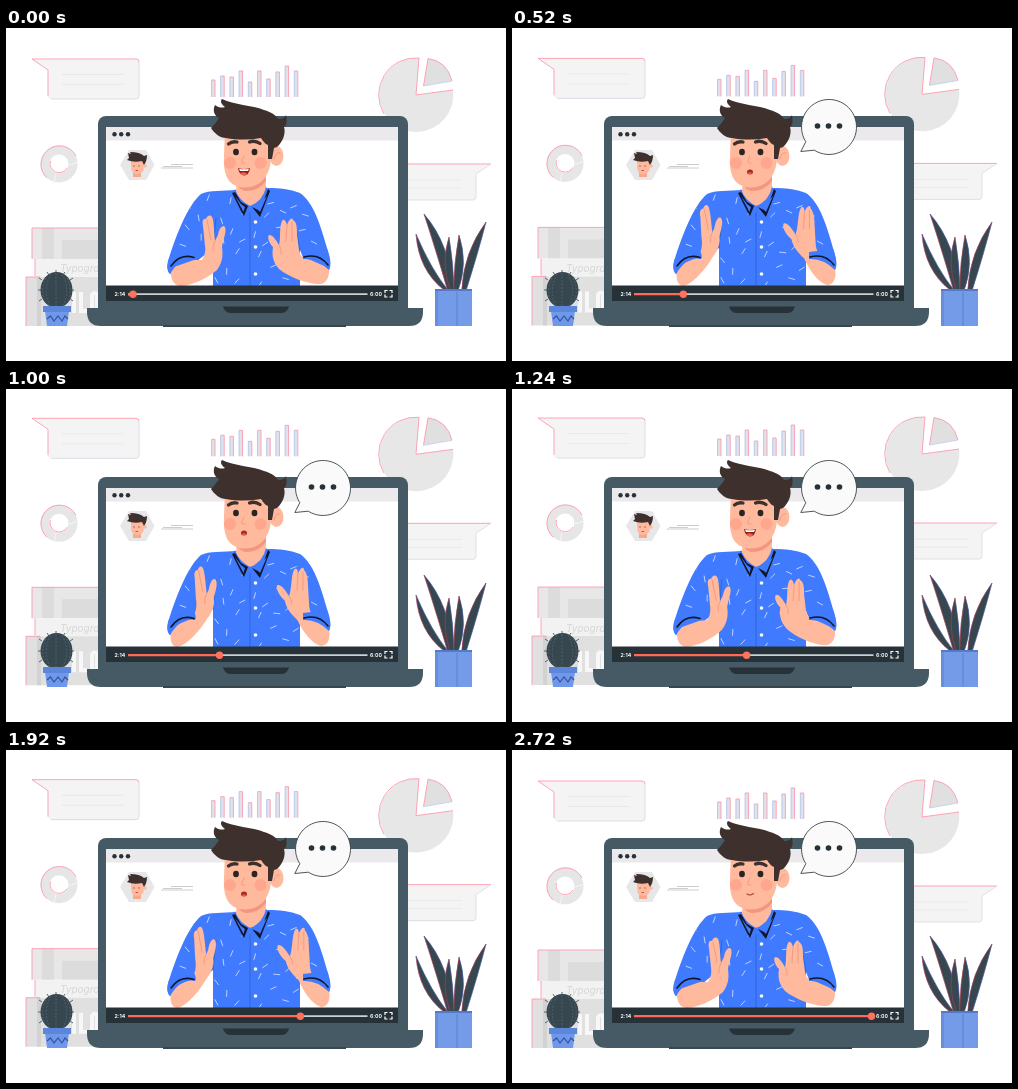
These frames come from a looping animation (500 by 333 pixels, 2740 ms). An HTML page:

```html
<!DOCTYPE html>
<html lang="en">
<head>
<meta charset="utf-8">
<title>Video call</title>
<style>
html, body { margin: 0; width: 100%; height: 100%; overflow: hidden; background: #fff; }
svg { display: block; width: 100%; height: 100%; }
text { font-family: Inter, sans-serif; }
.float, .hand, .talk, .played, .knob { animation: 2740ms linear infinite; }
.float { animation-name: float; animation-timing-function: ease-in-out; }
@keyframes float { 50% { transform: translateY(-2px); } }
.hand { d: var(--closed); animation-duration: 1370ms; animation-timing-function: ease-in-out; animation-name: wave; }
@keyframes wave {
  0%, 97%, 100% { d: var(--closed); }
  44%, 67% { d: var(--open); }
}
.left.hand {
  --closed: path("M165 240C164 250 167 257 174 258C184 258 201 251 211 242C217 234 217 226 216 219C217 211 221 204 219 199C217 196 213 200 212 207L209 213C208 205 208 192 206 189C204 186 201 188 200 191C197 190 196 194 197 198L199 218C200 224 198 229 196 232L188 232Z");
  --open: path("M165 238C164 250 164 257 171 258C179 257 192 243 200 229C207 220 208 213 207 208C209 201 211 194 209 190C206 187 203 193 202 200L200 204C199 196 198 181 196 178C194 175 192 177 191 180C188 180 187 184 188 188L189 208C190 214 190 219 188 224L184 230Z");
}
.right.hand {
  --closed: path("M323 240C324 252 318 257 311 256C299 255 283 249 273 241C266 233 266 226 267 219C263 215 261 209 263 207C267 207 270 212 273 217C275 210 273 199 276 193C278 190 280 193 281 197C283 191 286 189 287 192C291 194 291 200 291 207L293 222C294 228 297 230 300 230Z");
  --open: path("M323 240C325 250 322 257 315 257C306 254 298 242 293 230C284 222 281 216 280 211C274 206 270 198 272 195C276 194 280 200 284 206C287 198 286 186 289 180C291 177 293 179 293 183C296 177 299 176 299 180C302 183 303 190 303 196L304 214C304 219 305 223 308 227Z");
}
.left.hand.crease {
  --closed: path("M201 192L205 212M209 213Q206 218 207 223");
  --open: path("M192 181L196 202M200 204Q197 209 198 214");
}
.right.hand.crease {
  --closed: path("M281 197L280 213M286 194L286 213M273 217Q276 221 275 226");
  --open: path("M293 183L292 200M298 182L298 200M284 206Q287 210 287 214");
}
.talk { transform-origin: 290px 124px; animation-name: pop; }
@keyframes pop {
  0%, 6.2% { transform: scale(0); animation-timing-function: ease-in-out; }
  17.2%, 100% { transform: scale(1); }
}
.played { transform-origin: 122px 0; animation-name: fill; }
@keyframes fill { 0% { transform: scaleX(.0147); } 97.15%, 100% { transform: none; } }
.knob { animation-name: slide; }
@keyframes slide { 97.15%, 100% { transform: translateX(234px); } }
.edge { fill: none; stroke: #ff9aae; stroke-width: .9; }
.rule { fill: none; stroke: #e6e6e6; stroke-width: .8; }
.skin { fill: #ffb99c; }
.blue { fill: #407bff; }
.crease { fill: none; stroke: #f08f78; stroke-width: .7; stroke-linecap: round; }
.ink { fill: none; stroke: #10172b; stroke-width: 1.6; stroke-linecap: round; }
</style>
</head>
<body>
<svg viewBox="0 0 500 333" preserveAspectRatio="none">
  <defs>
    <clipPath id="shirtClip"><path d="M196 166L226 164L238 188L254 188L264 162L293 166C306 183 316 205 320 220L299 224L294 222V257H207V220L190 228L166 230C172 207 181 179 196 166Z"/></clipPath>
  </defs>

  <g class="float">
    <path fill="#f4f4f4" d="M26 31H130Q133 31 133 34V68Q133 71 130 71H45Q42 71 42 68V42Z"/>
    <path class="edge" d="M42 68V42L26 31H130Q133 31 133 34"/>
    <path class="edge" style="stroke:#d9dbe4" d="M133 34V68Q133 71 130 71H45"/>
    <path class="rule" d="M56 46.500H117M56 56.500H117"/>

    <g id="bars"></g>

    <path fill="#e7e7e7" d="M410 67L413 30A37 37 0 1 0 447 62Z"/>
    <path class="edge" d="M410 67L413 30A37 37 0 0 0 378 86M410 67L447 62"/>
    <path fill="#e0e0e0" d="M417.500 58L422 30.500Q441 33 446 53Z"/>
    <path class="edge" d="M417.500 58L422 30.500Q441 33 446 53"/>
    <path class="edge" style="stroke:#c8d0ee" d="M417.500 58L446 53"/>

    <circle cx="53" cy="136" r="14" fill="none" stroke="#e6e6e6" stroke-width="9"/>
    <path fill="none" stroke="#f6f6f6" d="M63 137L72 134M50 146L48 155"/>
    <path class="edge" d="M41 150A18.500 18.500 0 1 1 70 128M44.500 133A9 9 0 0 0 61 140"/>

    <path fill="#f4f4f4" d="M392 136H485L470 146V169Q470 172 467 172H392Z"/>
    <path class="edge" d="M401 136H485"/>
    <path class="edge" style="stroke:#dcdee6" d="M485 136L470 146V169Q470 172 467 172H401"/>
    <path class="rule" d="M402 152H456M402 160H456"/>

    <path fill="#e7e7e7" d="M26 200H93V231H26Z"/>
    <path fill="#dcdcdc" d="M36 200H48V231H36ZM56 212H93V231H56Z"/>
    <path fill="#f2f2f2" d="M29 231H93V249H29Z"/>
    <text x="54" y="244.500" font-size="10" font-style="italic" fill="#d6d6d6">Typography</text>
    <path fill="#e0e0e0" d="M20 249H93V298H20Z"/>
    <path fill="#d2d2d2" d="M31 249H35V298H31Z"/>
    <path fill="none" stroke="#f7f7f7" stroke-width="4" d="M68 264V285M75 264V283H81M86 267Q88 264 91 266V283H86Z"/>
    <path class="edge" d="M26 231V200H93M29 248V231M20 298V249H34"/>
  </g>

  <g id="plant"></g>
  <path fill="#739be7" d="M429 261H466V298H429Z"/>
  <path fill="#668edb" d="M429 261H432V298H429ZM450 264H452V298H450Z"/>
  <path fill="#5379c7" d="M429 261H466V263H429Z"/>

  <path fill="none" stroke="#37474f" stroke-width=".8" d="M36 252L33 250M35 262H32M36 271L33 273M64 252L67 250M65 262H68M64 271L67 273M43 247L41 244M50 245V242M57 247L59 244"/>
  <ellipse cx="50.500" cy="262" rx="16" ry="18" fill="#37474f"/>
  <path fill="none" stroke="#566870" stroke-width=".8" stroke-dasharray="2 1.500" d="M50 245V279M45 246Q36 262 44 278M56 246Q65 262 57 278M40 250Q34 262 39 274M61 250Q67 262 62 274"/>
  <path fill="#6f98ea" d="M39 283H63L61 298H41Z"/>
  <path fill="#5c86d9" d="M37 278H65V284H37Z"/>
  <path fill="none" stroke="#31549e" stroke-width="1.200" d="M41 291L44.500 288L48 293L52 288L56 293L59 288L62 291"/>

  <rect x="92" y="88" width="310" height="200" rx="8" fill="#455a64"/>
  <path fill="#fff" d="M100 99H392V258H100Z"/>
  <path fill="#ebe9eb" d="M100 99H392V112.500H100Z"/>
  <g fill="#263238"><circle cx="108.500" cy="106.300" r="2.200"/><circle cx="115.200" cy="106.300" r="2.200"/><circle cx="122" cy="106.300" r="2.200"/></g>
  <path fill="#455a64" d="M81 280H417V284Q417 298 403 298H95Q81 298 81 284Z"/>
  <path fill="#37474f" d="M157 297H340V299H157Z"/>
  <path fill="#263238" d="M217 278.500H283Q281 285 276 285H224Q219 285 217 278.500Z"/>

  <path fill="#e7e7e9" d="M114 137L123 122H140L148.500 137L140 152H123Z"/>
  <path fill="#f5aa8d" d="M127 142H135V149H127Z"/>
  <path class="skin" d="M125 132H138V138Q138 146 131 146Q125 146 125 138Z"/>
  <circle cx="139" cy="138" r="1.800" class="skin"/>
  <path fill="#3d302d" d="M121 132L123 130L122 125L125 126L124 124Q134 124 138 128L141 127Q141 133 138 137L136 133Q128 135 121 132Z"/>
  <path fill="none" stroke="#3d302d" d="M127.500 138h1M132.500 138h1"/>
  <path fill="none" stroke="#d54b45" d="M129.500 142.500h2.500"/>
  <path fill="none" stroke="#c0c0c0" stroke-width=".8" d="M165 136.500H187M155 140H187M157 138.500H176"/>

  <g id="person">
    <path class="blue" d="M230 162C217 163 203 162 195 166C182 177 171 205 163 230C160 238 161 243 164 246L190 234L207 220V258H294V222L298 232L323 242C326 237 324 229 321 220C314 195 307 174 294 165C284 161 273 160 262 160Z"/>
    <path fill="none" stroke="#2e5fcc" stroke-width=".8" d="M207 220L210 190M294 222L289 196M244 184V258"/>
    <g id="dashes" clip-path="url(#shirtClip)" stroke="#dce7ff" stroke-width=".8" stroke-linecap="round"></g>
    <path class="skin" d="M231 148H260V164Q253 178 244 178Q234 173 230 164Z"/>
    <path fill="#f2967e" d="M232 156Q249 161 260 149V153Q253 163 239 163Q232 161 232 156Z"/>
    <path class="blue" d="M229 161Q232 172 244 178L238 187L226 166ZM260 159Q257 173 244 178L254 187L264 163Z"/>
    <path fill="#10172b" d="M226 165L229 164L235 174L242 178L238 188L235 183ZM262 161L264 163L254 189L246 179L254 183Z"/>
    <path class="blue" d="M229 168L235 176L239 179L237.500 184ZM261 168L254 184L249 178L256 173Z"/>
    <g fill="#fff"><circle cx="249.500" cy="194" r="1.800"/><circle cx="249.500" cy="219" r="1.800"/><circle cx="249.500" cy="246" r="1.800"/></g>

    <ellipse cx="270.500" cy="128" rx="7" ry="10" class="skin"/>
    <path class="crease" d="M268 131Q270 123 274 125"/>
    <path class="skin" d="M219 102L218 128C217 147 222 158.500 238 159.500C254 160 264 148 265 131L267 104Z"/>
    <g fill="#ff9681" opacity=".5"><circle cx="224" cy="135" r="6"/><circle cx="254.500" cy="135" r="6"/></g>
    <path fill="#3d302d" d="M205 100C209 96 211 93 213 90C207 87 207 81 209 77C213 80 216 80 219 79C215 76 214 73 216 71C228 77 246 77 258 82C265 84 270 87 272 91Q279 91 280 87C281 93 281 97 278 99C280 105 277 114 271 119L268 120L266 131H262V117C259 116 257 113 255 110C243 112 231 112 220 110C214 110 208 105 205 100Z"/>
    <path fill="none" stroke="#3d302d" stroke-width="3.300" stroke-linecap="round" d="M222.500 116Q226 113 231 114M243.500 114Q249 112 254 115.500"/>
    <g fill="#2c2423"><ellipse cx="230" cy="124" rx="2.900" ry="3.200"/><ellipse cx="248.500" cy="124" rx="2.900" ry="3.200"/></g>
    <path class="crease" d="M238 128L235.500 134Q237 136 239 135"/>
    <g class="mouth" data-shape="open">
      <path fill="#8d211f" d="M232 140Q238 142 244 140Q243 147.500 238 147.500Q233 147 232 140Z"/>
      <path fill="#fff" d="M233 140.700Q238 142 243 140.700L242 143H234Z"/>
      <path fill="#f0604f" d="M234 145.500Q238 143 241.500 146Q238 149 234 145.500Z"/>
    </g>
    <g class="mouth" data-shape="smile">
      <path fill="#a52a27" d="M232.500 140.500Q238 142 243.500 140.500Q242 146.500 238 146.500Q234 146 232.500 140.500Z"/>
      <path fill="#fff" d="M233.500 141.200Q238 142.500 242.500 141.200L241 144H235Z"/>
    </g>
    <g class="mouth" data-shape="round">
      <ellipse cx="238" cy="144" rx="3" ry="2.500" fill="#a52a27"/>
      <ellipse cx="238" cy="145.200" rx="1.800" ry="1" fill="#f0604f"/>
    </g>
    <g class="mouth" data-shape="closed">
      <path fill="none" stroke="#b74a40" stroke-width="1.200" stroke-linecap="round" d="M235 144Q238 146 241.500 143.500"/>
    </g>

    <path class="hand left skin"/>
    <path class="hand left crease"/>
    <path class="hand right skin"/>
    <path class="hand right crease"/>
    <path class="blue" d="M163 230L188 223Q191 228 189 231Q175 228 164 246Q160 242 163 230ZM297 224L321 221Q326 235 323 242Q311 230 297 231Z"/>
    <path class="ink" d="M165 238Q174 225 188 229.500M298 229Q313 225 322 237"/>
  </g>

  <path fill="#263238" d="M100 257.500H392V273H100Z"/>
  <g fill="#fff" font-size="5.200" font-weight="700"><text x="108.500" y="268">2:14</text><text x="364" y="268">6:00</text></g>
  <path fill="none" stroke="#fff" stroke-width="1.200" d="M379 265V262.500H381.500M383.500 262.500H386V265M386 266.500V269H383.500M381.500 269H379V266.500"/>
  <path fill="#c9d0d4" d="M122 265.300H361.500V267H122Z"/>
  <path class="played" fill="#ff6a57" d="M122 265H359.500V267.200H122Z"/>
  <circle class="knob" cx="125.500" cy="266.300" r="3.700" fill="#ff725e"/>

  <g class="talk">
    <path fill="#fafafa" stroke="#3b4347" stroke-width=".9" d="M288.800 123.500L293.800 113.700A27.500 27.500 0 1 1 302.300 122.200Z"/>
    <g fill="#263238"><circle cx="305.500" cy="98" r="2.800"/><circle cx="316.500" cy="98" r="2.800"/><circle cx="327.500" cy="98" r="2.800"/></g>
  </g>
</svg>
<script>
const NS = "http://www.w3.org/2000/svg";
const LOOP = 2740;

function add(parent, attrs) {
  const path = document.createElementNS(NS, "path");
  for (const name in attrs) path.setAttribute(name, attrs[name]);
  document.getElementById(parent).append(path);
}

[52, 48, 49, 43, 54, 43, 51, 44, 38, 43].forEach((top, i) => {
  const x = 205.5 + i * 9.2;
  add("bars", { d: `M${x} ${top}h3.500V69h-3.500Z`, fill: "#dfe2ea" });
  add("bars", { d: `M${x} ${top}h3.500V69`, class: "edge" });
  add("bars", { d: `M${x} ${top}V69`, class: "edge", style: "stroke:#b5c3ee" });
});

// Each leaf: tip, bend, foot x, half width.
const leaves = [
  [410, 206, 419, 242, 440, 4], [480, 194, 465, 224, 458, 4.5],
  [418, 186, 436, 216, 444, 5], [443, 209, 441, 235, 446, 4],
  [453, 207, 455, 235, 450, 4.5]
];
for (const [x, y, bendX, bendY, foot, w] of leaves) {
  const left = `M${x} ${y}Q${bendX - 1.6 * w} ${bendY} ${foot - w / 2} 262`;
  const right = `Q${bendX + 1.6 * w} ${bendY} ${x} ${y}`;
  add("plant", { d: `${left}H${foot + w / 2}${right}Z`, fill: "#37474f" });
  add("plant", { d: left, fill: "none", stroke: "#a63d55", "stroke-width": .7 });
  add("plant", { d: `M${foot + w / 2} 262${right}`, fill: "none", stroke: "#4257a0", "stroke-width": .7 });
}

// Evenly scattered strokes on the shirt.
for (let i = 1; i <= 46; i++) {
  const x = 168 + 154 * (i * 0.7549 % 1);
  const y = 166 + 90 * (i * 0.5698 % 1);
  const angle = i * 2.4;
  add("dashes", { d: `M${x} ${y}l${6 * Math.cos(angle)} ${6 * Math.sin(angle)}` });
}

const speech = [
  [0, "open"], [180, "smile"], [400, "round"], [560, "open"], [700, "smile"],
  [900, "round"], [1160, "open"], [1380, "smile"], [1600, "open"],
  [1780, "round"], [2060, "smile"], [2200, "open"], [2400, "smile"], [2560, "closed"]
];
for (const mouth of document.querySelectorAll(".mouth")) {
  const frames = speech.map(([time, shape]) => ({
    offset: time / LOOP,
    opacity: shape === mouth.dataset.shape ? 1 : 0,
    easing: "step-end"
  }));
  frames.push({ ...frames.at(-1), offset: 1 });
  mouth.animate(frames, { duration: LOOP, iterations: Infinity });
}
</script>
</body>
</html>
```
